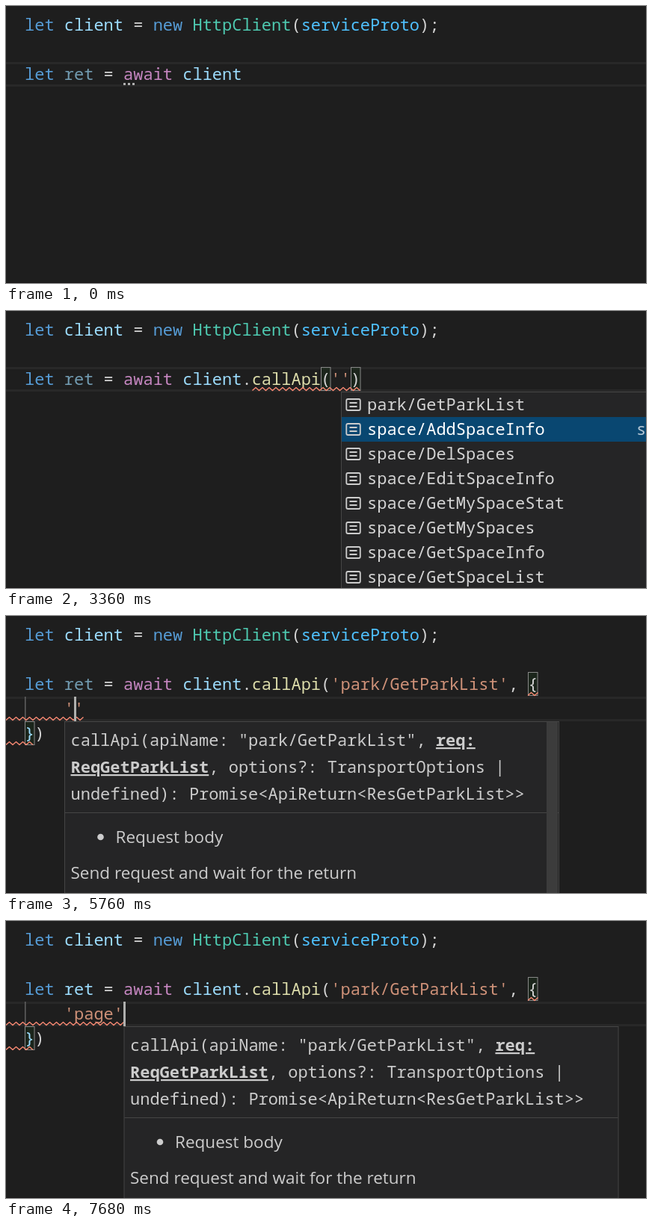
An HTML page that plays this animation: 856 by 371 pixels, repeating every 8000 ms.

```html
<!DOCTYPE html>
<html lang="en">
<head>
<meta charset="utf-8">
<title>Code completion</title>
<style>
  html, body { margin: 0; width: 100%; height: 100%; overflow: hidden; background: #1e1e1e; }
  svg { display: block; }
  text { white-space: pre; font: 22px "Noto Sans Mono", monospace; }
  .doc { font: 22.5px "Open Sans", sans-serif; fill: #ccc; }
  .doc.it { font-style: italic; }
  .on { font-weight: 700; text-decoration: underline; }
</style>
</head>
<body>
<svg id="stage" width="856" height="371" viewBox="0 0 856 371"></svg>
<script>
const stage = document.getElementById('stage');
const LOOP = 8000, CH = 13.2, LEFT = 25, ROW = 33;
const C = {
  key: '#569cd6', name: '#9cdcfe', dim: '#729cb2', op: '#d4d4d4', type: '#4ec9b0',
  konst: '#4fc1ff', flow: '#c586c0', fn: '#dcdcaa', str: '#ce9178', err: '#f48771',
  text: '#cccccc', panel: '#252526', edge: '#454545', pick: '#094771'
};
const API = 'park/GetParkList';
const PATHS = [API, ...['AddSpaceInfo', 'DelSpaces', 'EditSpaceInfo', 'GetMySpaceStat',
  'GetMySpaces', 'GetSpaceInfo', 'GetSpaceList'].map(s => 'space/' + s)];

const colX = c => LEFT + c * CH;
const rowY = r => 9 + r * ROW;          // top of an editor row
const esc = s => s.replace(/&/g, '&amp;').replace(/</g, '&lt;');
const rect = (x, y, w, h, fill, more = '') =>
  `<rect x="${x}" y="${y}" width="${w}" height="${h}" fill="${fill}" ${more}/>`;
const span = ([fill, s, cls = '']) => `<tspan fill="${fill}" class="${cls}">${esc(s)}</tspan>`;
const line = (x, y, ...parts) => `<text x="${x}" y="${y}">${parts.map(span).join('')}</text>`;
const doc = (x, y, s, cls = '') => `<text class="doc ${cls}" x="${x}" y="${y}">${s}</text>`;
const stroke = (d, color, w) =>
  `<path d="${d}" fill="none" stroke="${color}" stroke-width="${w}" stroke-linejoin="round"/>`;

function squiggle(row, x0, x1) {
  const y = rowY(row) + 29.5;
  let d = `M${x0} ${y + 2}`;
  for (let x = x0 + 4.5, up = true; x <= x1 + 1; x += 4.5, up = !up) d += `L${x} ${y + (up ? -2 : 2)}`;
  return stroke(d, C.err, 1.5);
}

const bracket = (row, col) => rect(Math.round(colX(col)) + .5, rowY(row) + .5, 12.5, 31,
  'rgba(0,100,0,.1)', 'stroke="#888"');

function code(s) {
  return (s.match(/'[^']*'?|\w+|[^\w']+/g) || []).map(t =>
    [t[0] === "'" ? C.str : t === 'callApi' ? C.fn : /\w/.test(t) ? C.name : C.op, t]);
}

const icons = {
  method: (x, y) => stroke(`M${x} ${y - 10}l9 4.5v10.5l-9 5l-9-5v-10.5zM${x - 9} ${y - 5}l9 4.5l9-4.5M${x} ${y - .5}v10.5`, '#fff', 1.8),
  field: (x, y) => stroke(`M${x + 2} ${y - 8.5}l8 4v7l-12 6l-8-4v-7zM${x - 10} ${y - 2.5}l8 4l12-6M${x - 2} ${y + 1.5}v7`, '#75beff', 1.7),
  value: (x, y) => rect(x - 9.2, y - 7.5, 18.5, 15, 'none', 'rx="2" stroke="#ccc" stroke-width="1.8"') +
    stroke(`M${x - 5} ${y - 2.5}h10M${x - 5} ${y + 2.5}h10`, '#ccc', 1.8)
};

// Completion list: items are {icon, label, hit, info, infoX}
function list(x, items, sel) {
  const h = items.length * ROW + 5;
  let out = rect(x + .5, 108.5, 600, h, C.panel, `stroke="${C.edge}"`);
  items.forEach((it, i) => {
    const y = 109 + i * ROW, on = i === sel, hit = it.hit || 0;
    const fg = on ? '#fff' : C.op;
    if (on) out += rect(x + 1, y, 600, ROW, C.pick);
    out += icons[it.icon](x + 16.5, y + 16.5);
    out += line(x + 35, y + 24, ['#18a3ff', it.label.slice(0, hit)], [fg, it.label.slice(hit)]);
    if (on && it.info) out += line(it.infoX, y + 24, ['#b3c6d4', it.info]);
  });
  return out;
}

const members = (x, hit, n = 2) => list(x, [
  { icon: 'method', label: 'callApi', hit, info: '(method) BaseClient<ServiceType>', infoX: x + 220 },
  { icon: 'field', label: 'serviceMap' }
].slice(0, n), 0);

const paths = sel => list(448, PATHS.map(p =>
  ({ icon: 'value', label: p, info: p, infoX: 843 + (18 - p.length) * CH })), sel);

// Signature help; arg 0 marks apiName, arg 1 marks req
function hint(x, top, arg, bar) {
  const tx = x + 8.5, t = C.text, mark = i => i === arg ? 'on' : '';
  let out = rect(x + .5, top + .5, 661, 300, C.panel, `stroke="${C.edge}"`);
  out += line(tx, top + 33, [t, 'callApi('], [t, `apiName: "${API}"`, mark(0)], [t, ', '], [t, 'req:', mark(1)]);
  out += line(tx, top + 69, [t, 'ReqGetParkList', mark(1)], [t, ', options?: TransportOptions |']);
  out += line(tx, top + 105, [t, 'undefined): Promise<ApiReturn<ResGetParkList>>']);
  out += rect(x + 1, top + 122, 660, 1, C.edge);
  if (arg) {
    out += `<circle cx="${tx + 40}" cy="${top + 155}" r="4.3" fill="${t}"/>`;
    out += doc(tx + 60, top + 163, 'Request body');
    out += doc(tx, top + 211, 'Send request and wait for the return');
  } else {
    out += doc(tx, top + 163, 'Send request and wait for the return');
    out += doc(tx, top + 211, '@returns', 'it');
    out += doc(tx, top + 247, 'return a');
    out += rect(x + 98, top + 225, 140, 29, '#1e1e1e', 'rx="4"');
    out += line(x + 108, top + 247, [t, 'ApiReturn']);
  }
  if (bar) out += rect(x + 645, top + 1, 15, 300, '#3c3c3c');
  return out;
}

const CALL = s => `.callApi('${s}')`;
const OPEN = `.callApi('${API}', {`;
const sqCall = cols => [[2, 329.5, colX(cols)]];
const sqAll = end => [[2, 698, 711], [3, 0, end], [4, 0, 38]];
const sqWord = end => [[3, 78, end], [4, 25, 38]];
const low = (x, bar) => () => hint(x, 141, 1, bar);

// Each step changes only the listed parts of the state.
const steps = [
  [0, { tail: '', cur: null, row: 2, dim: true, dots: true, sq: [], box: [], pop: null, body: null }],
  [480, { cur: 22 }],
  [960, { cur: null }],
  [1320, { tail: '.', cur: 23 }],
  [1440, { tail: '.c', cur: 24, sq: sqCall(24), pop: () => members(342, 1) }],
  [1800, { tail: '.ca', cur: 25, dots: false, sq: sqCall(25), pop: () => members(355, 2) }],
  [1920, { tail: '.call', cur: 27, dim: false, sq: sqCall(27), pop: () => members(382, 4, 1) }],
  [2040, { tail: '.callApi', cur: 30, sq: [], pop: null }],
  [2280, { tail: '.callApi()', cur: 31, box: [[2, 30], [2, 31]] }],
  [2400, { tail: CALL(''), cur: 32, dim: true, dots: true, box: [[2, 30], [2, 33]] }],
  [2520, { sq: sqCall(34), pop: () => paths(0) }],
  [2880, { dots: false, pop: () => paths(1) }],
  [3000, { pop: () => paths(2) }],
  [3360, { cur: null, pop: () => paths(1) }],
  [3480, { pop: () => paths(0) }],
  [3720, { tail: CALL(API), cur: 48, sq: sqCall(50), box: [[2, 30], [2, 49]], pop: null }],
  [3840, { pop: () => hint(657, 108, 0) }],
  [4200, { cur: 49, pop: () => hint(668, 108, 0) }],
  [4680, { tail: `.callApi('${API}',)`, cur: 50, sq: [], box: [[2, 30], [2, 50]] }],
  [4800, { tail: `.callApi('${API}', )`, cur: 51, box: [[2, 30], [2, 51]], pop: () => hint(695, 108, 1) }],
  [4920, { tail: OPEN + '})', cur: 52, box: [[2, 51], [2, 52]], pop: () => hint(708, 108, 1) }],
  [5160, { tail: OPEN, body: '', row: 3, cur: 4, box: [[2, 51], [4, 0]], pop: null }],
  [5280, { pop: low(78, true) }],
  [5400, { sq: [[2, 698, 711], [4, 0, 38]] }],
  [5760, { body: "''", cur: 5, sq: sqAll(104) }],
  [5880, { pop: low(91) }],
  [6240, { body: "'p'", cur: 6, dim: false, sq: sqWord(118) }],
  [6600, { body: "'pa'", cur: 7, sq: sqWord(131) }],
  [6720, { body: "'pag'", cur: 8, sq: sqWord(144) }],
  [7200, { body: "'page'", cur: 9, sq: sqWord(157), pop: low(144.5) }],
  [7560, { cur: 10, sq: sqAll(157) }],
  [7680, { pop: low(157.5) }]
];
let last = {};
const states = steps.map(([, change]) => last = { ...last, ...change });

function draw(s) {
  const top = rowY(s.row);
  let out = rect(0, 0, 856, 371, '#1e1e1e') + rect(0, 370, 856, 1, '#191617');
  out += rect(0, top, 856, 3, '#282828') + rect(0, top + 30, 856, 3, '#282828');
  out += s.box.map(b => bracket(...b)).join('');
  out += line(LEFT, 33, [C.key, 'let'], [C.name, ' client'], [C.op, ' = '], [C.key, 'new'],
    [C.type, ' HttpClient'], [C.op, '('], [C.konst, 'serviceProto'], [C.op, ');']);
  out += line(LEFT, 99, [C.key, 'let'], [s.dim ? C.dim : C.name, ' ret'], [C.op, ' = '],
    [C.flow, 'await'], [C.name, ' client'], ...code(s.tail));
  if (s.body !== null) {
    out += rect(25, 108, 1.5, ROW, '#606060');
    out += line(colX(4), 132, ...code(s.body));
    out += line(LEFT, 165, [C.name, '}'], [C.op, ')']);
  }
  if (s.dots) for (let i = 0; i < 3; i++) out += rect(157 + i * 6, 103, 3, 3, '#b0b0b0');
  out += s.sq.map(q => squiggle(...q)).join('');
  if (s.cur !== null) out += rect(Math.round(colX(s.cur)), top, 3, ROW, '#aeafad');
  if (s.pop) out += s.pop();
  stage.innerHTML = out;
}

let shown = -1;
function tick() {
  const t = performance.now() % LOOP;
  let i = steps.length - 1;
  while (steps[i][0] > t) i--;
  if (i !== shown) draw(states[shown = i]);
  requestAnimationFrame(tick);
}
tick();
</script>
</body>
</html>
```
